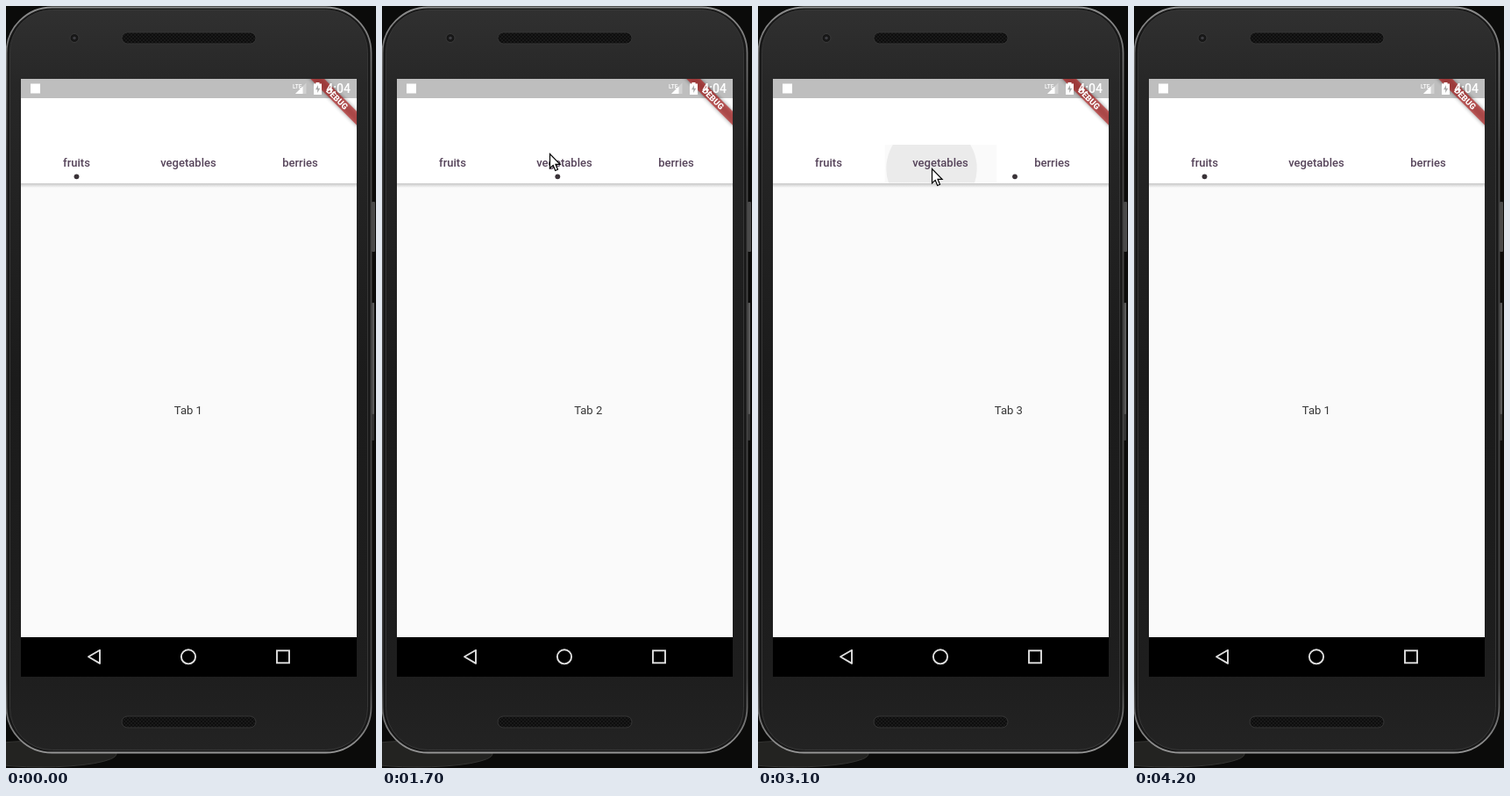
Write an HTML page that moves like this. It is 422 by 868 pixels and loops after 4700 ms.

```html
<!DOCTYPE html>
<html lang="en">
<head>
<meta charset="utf-8">
<title>Tab bar with dot indicator</title>
<style>
  html, body { margin: 0; width: 100%; height: 100%; overflow: hidden; background: #0b0b0a; }
  svg { display: block; width: 422px; height: 868px; }
  text { font-family: Roboto, "Noto Sans", sans-serif; }
  .label { font-size: 13.05px; text-anchor: middle; }
  #tabs { fill: #56445a; font-weight: 500; }
  #pages { fill: #363636; }
  #nav { fill: none; stroke: #dfdfdf; stroke-width: 1.9; }
</style>
</head>
<body>
<svg viewBox="0 0 422 868">
  <defs>
    <linearGradient id="face" x1="0" y1="0" x2="0" y2="1">
      <stop offset="0" stop-color="#303030"/>
      <stop offset=".1" stop-color="#272727"/>
      <stop offset=".5" stop-color="#1b1b1b"/>
      <stop offset=".9" stop-color="#1e1e1e"/>
      <stop offset="1" stop-color="#232323"/>
    </linearGradient>
    <linearGradient id="rim" x1="0" y1="0" x2="0" y2="1">
      <stop offset="0" stop-color="#8c8c8c"/>
      <stop offset=".06" stop-color="#747474"/>
      <stop offset=".2" stop-color="#444"/>
      <stop offset=".9" stop-color="#444"/>
      <stop offset="1" stop-color="#959595"/>
    </linearGradient>
    <linearGradient id="shade" x1="0" y1="0" x2="0" y2="1">
      <stop offset="0" stop-color="#bcbcbc"/>
      <stop offset="1" stop-color="#fafafa"/>
    </linearGradient>
    <pattern id="mesh" width="4" height="4" patternUnits="userSpaceOnUse">
      <rect width="4" height="4" fill="#191919"/>
      <circle cx="1" cy="1" r="1" fill="#0a0a0a"/>
      <circle cx="3" cy="3" r="1" fill="#0a0a0a"/>
    </pattern>
    <filter id="blur" x="-20%" y="-80%" width="140%" height="260%"><feGaussianBlur stdDeviation="2.5"/></filter>
    <clipPath id="screen"><rect x="17" y="83" width="383" height="681"/></clipPath>
    <clipPath id="tabClip"><rect id="tabBox" y="158" width="127.7" height="43.5"/></clipPath>
  </defs>

  <!-- device -->
  <rect width="422" height="868" fill="#0b0b0a"/>
  <ellipse cx="40" cy="852" rx="86" ry="15" fill="#232321" stroke="#353533"/>
  <rect x="417" y="223" width="4" height="57" rx="1" fill="#4a4a4a"/>
  <rect x="417" y="338" width="3" height="157" rx="1" fill="#333"/>
  <rect x="417.5" y="338" width="2.5" height="127" rx="1" fill="#595959"/>
  <rect x=".5" y="1.5" width="416" height="849" rx="52" fill="#181818" stroke="url(#rim)" stroke-width="1.8"/>
  <rect x="4.5" y="4.5" width="408" height="843" rx="48" fill="url(#face)" stroke="#363636"/>
  <circle cx="78" cy="36.5" r="5" fill="#171717" stroke="#3b3b3b"/>
  <circle cx="78" cy="36.5" r="1.8" fill="#3d3d42"/>
  <g fill="url(#mesh)" stroke="#353535">
    <rect x="132" y="30" width="153" height="13" rx="6.5"/>
    <rect x="132" y="809" width="153" height="13" rx="6.5"/>
  </g>

  <g clip-path="url(#screen)">
    <rect x="17" y="83" width="383" height="636" fill="#fafafa"/>
    <g id="pages"></g>
    <rect x="17" y="201" width="383" height="6" fill="url(#shade)"/>
    <rect x="17" y="83" width="383" height="119" fill="#fff"/>

    <g id="ripple" clip-path="url(#tabClip)">
      <rect x="17" y="158" width="383" height="44" fill-opacity=".02"/>
      <circle id="ink" fill-opacity=".058"/>
    </g>
    <g id="tabs"></g>
    <circle id="dot" cy="194.3" r="2.9" fill="#3a3338"/>

    <!-- status bar -->
    <rect x="17" y="83" width="383" height="22" fill-opacity=".255"/>
    <g transform="translate(400 83) rotate(45) scale(.932)">
      <rect x="-60" y="28" width="120" height="12" fill-opacity=".42" filter="url(#blur)"/>
      <rect x="-60" y="28" width="120" height="12" fill="#b71c1c" fill-opacity=".63"/>
      <text y="37.6" font-size="10.2" font-weight="900" text-anchor="middle" fill="#fff">DEBUG</text>
    </g>
    <g fill="#fff">
      <rect x="28" y="88.5" width="11" height="11"/>
      <text x="327" y="93.5" font-size="6.5" font-weight="500">LTE</text>
      <path d="M330 100 342.500 87.500V100Z" fill-opacity=".3"/>
      <path d="M330 100 338.500 91.500V100Z"/>
      <path d="M351 88.500H353.500V87H357.500V88.500H360V101H351Z"/>
      <path d="M356 90 353 95.300H355.200V99L358.200 93.700H356Z" fill="#a9a9a9"/>
      <text x="365.300" y="99" font-size="14" font-weight="500">4:04</text>
    </g>

    <rect x="17" y="719" width="383" height="45"/>
    <g id="nav">
      <path d="M94 741.300 107 733.700V748.900Z" stroke-linejoin="round"/>
      <circle cx="208" cy="741.300" r="8.100"/>
      <rect x="309" y="734.300" width="14" height="14"/>
    </g>
  </g>

  <path id="cursor" d="M0 0V16.300L3.700 12.900 6.200 19 9 17.800 6.500 11.800H11.600Z" fill="#fff" stroke="#000" stroke-width="1.200"/>
</svg>

<script>
const LOOP = 4700, STEP = 100, PAGE = 383, TAB = PAGE / 3;
const $ = id => document.getElementById(id);
const tabX = i => 80.5 + 127.5 * i;
const clamp = v => Math.min(1, Math.max(0, v));

// The page trails the dot by `lag` ms.
const taps = [
  { at: 1400, from: 0, to: 1, x: 192, y: 170, dur: 430, lag: 10 },
  { at: 2400, from: 1, to: 2, x: 337, y: 187, dur: 300, lag: 33.6 },
  { at: 3035, from: 2, to: 1, x: 198, y: 185, dur: 300, lag: 17.4 },
  { at: 3750, from: 1, to: 0, x: 96, y: 184, dur: 300, lag: 25 }
];

// Pointer path: time, x, y
const path = [
  [600, 1, 153], [800, 70, 156], [1100, 184, 165], [1200, 191, 168], [1700, 191, 168],
  [1900, 285, 181], [2000, 322, 187.5], [2200, 337, 187], [2600, 337, 187],
  [2800, 198, 185], [3300, 198, 185], [3500, 96, 184], [3900, 96, 184], [4100, 18, 178]
];

function addText(parent, words, y) {
  return words.map((word, i) => {
    const el = document.createElementNS("http://www.w3.org/2000/svg", "text");
    el.textContent = word;
    el.setAttribute("class", "label");
    el.setAttribute("x", tabX(i));
    el.setAttribute("y", y);
    return $(parent).appendChild(el);
  });
}
addText("tabs", ["fruits", "vegetables", "berries"], 183.4);
const pages = addText("pages", ["Tab 1", "Tab 2", "Tab 3"], 465.2);

// cubic-bezier(.25, .1, .25, 1)
function ease(x) {
  if (x <= 0 || x >= 1) return clamp(x);
  const bez = (a, b, u) => 3 * a * u * (1 - u) ** 2 + 3 * b * u * u * (1 - u) + u ** 3;
  let lo = 0, hi = 1;
  for (let i = 0; i < 24; i++) {
    const mid = (lo + hi) / 2;
    if (bez(.25, .25, mid) < x) lo = mid; else hi = mid;
  }
  return bez(.1, 1, lo);
}

function pointer(t) {
  const i = path.findIndex(p => p[0] >= t);
  if (t < path[0][0] || i < 0) return null;
  const b = path[i], a = path[Math.max(0, i - 1)];
  const k = b === a ? 0 : (t - a[0]) / (b[0] - a[0]);
  return [a[1] + (b[1] - a[1]) * k, a[2] + (b[2] - a[2]) * k];
}

function draw(t) {
  const tap = taps.filter(p => p.at <= t).pop() || taps[0];
  const age = t - tap.at;
  const along = ms => tap.from + (tap.to - tap.from) * ease(ms / tap.dur);
  const page = along(age - tap.lag);

  $("dot").setAttribute("cx", tabX(along(age)));
  pages.forEach((el, i) => el.setAttribute("x", 207.9 + PAGE * (i - page)));

  $("ripple").setAttribute("opacity", age > 0 ? clamp((290 - age) / 140) : 0);
  $("tabBox").setAttribute("x", 17 + TAB * tap.to);
  $("ink").setAttribute("cx", tap.x);
  $("ink").setAttribute("cy", tap.y);
  $("ink").setAttribute("r", 29 + .35 * Math.max(0, age));

  const pos = pointer(t);
  $("cursor").setAttribute("visibility", pos ? "visible" : "hidden");
  if (pos) $("cursor").setAttribute("transform", `translate(${pos[0] + .5} ${pos[1] + .5})`);
}

const start = performance.now();
function tick() {
  const t = (performance.now() - start) % LOOP;
  draw(Math.floor(t / STEP) * STEP);
  requestAnimationFrame(tick);
}
tick();
</script>
</body>
</html>
```
